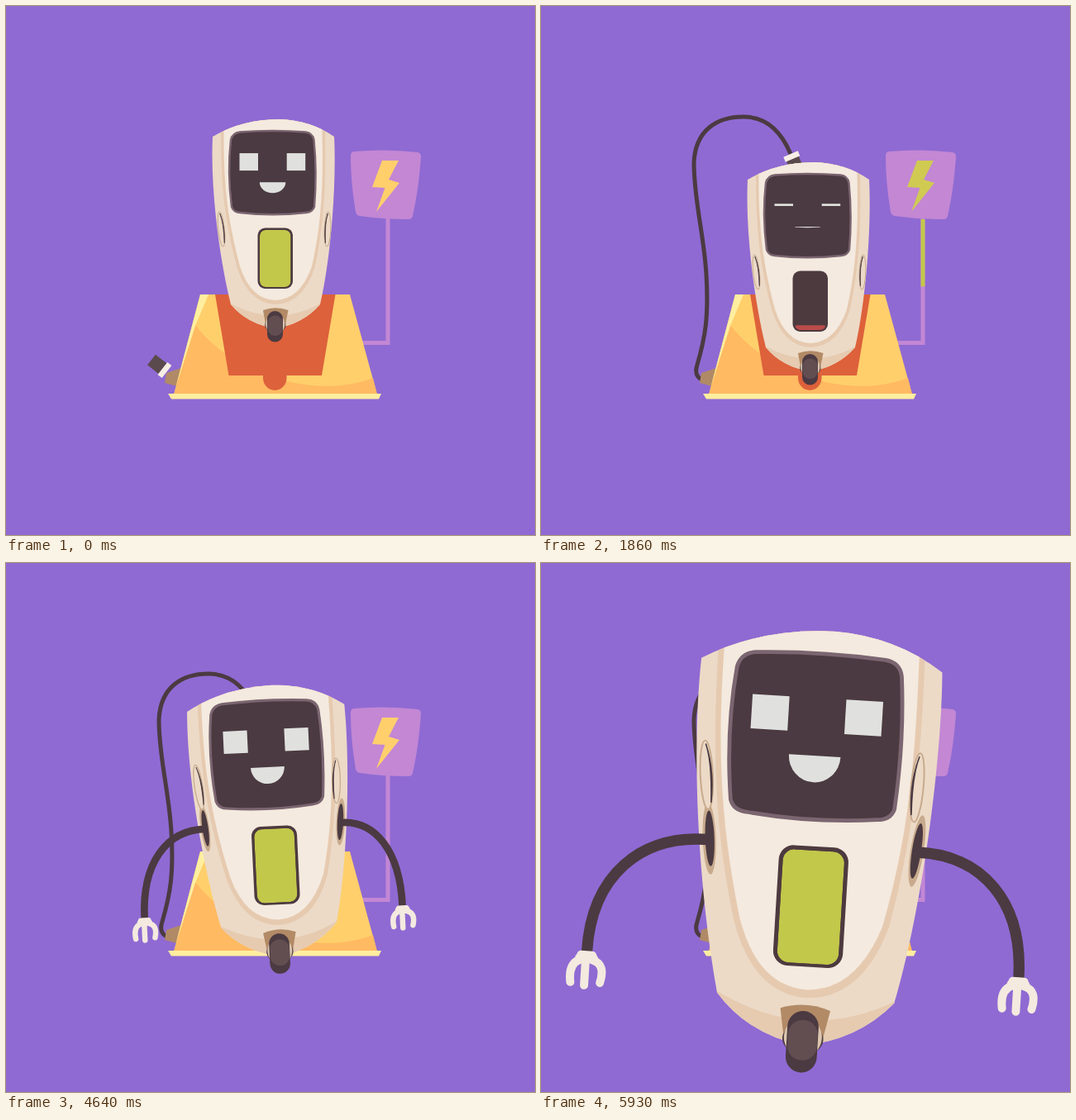
Animation of 640 by 640 pixels, one loop 6000 ms. Source, as an HTML page:

```html
<!DOCTYPE html>
<html lang="en">
<head>
<meta charset="utf-8">
<title>Charging robot</title>
<style>
html, body { margin: 0; width: 100%; height: 100%; overflow: hidden; background: #8f6ad3; }
svg { display: block; width: 100%; height: 100%; }
</style>
</head>
<body>
<svg viewBox="0 0 640 640">
  <defs>
    <path id="bodyShape" d="M250 158 Q285 137.500 330 137 Q368 138 397 158 C400 215 393 305 380 361 Q359 385 326 390 Q292 385 272 361 C258 305 247 220 250 158Z"/>
    <path id="screenShape" d="M283 152.500 Q322 149.500 362 152.500 Q371 153.500 372.500 162 Q376.500 201 373 243 Q371 249.500 363 250 Q322 254.500 283 250 Q275 249.500 273 243 Q267.500 201 272 162 Q274 153.500 283 152.500Z"/>
    <path id="cablePath" d="M203 454 C190 453 185 446 189 434 C199 400 203 375 200 325 C197 275 185 235 185 190 C186.500 150 213 134 245 134 C275 134 292 155 302 179"/>
    <clipPath id="bodyClip"><use href="#bodyShape"/></clipPath>
    <clipPath id="screenClip"><use href="#screenShape"/></clipPath>
    <clipPath id="cellClip"><rect x="307" y="271" width="37.500" height="69" rx="7"/></clipPath>
    <mask id="flowMask" maskUnits="userSpaceOnUse" x="0" y="0" width="640" height="640">
      <use id="flowWindow" href="#cablePath" fill="none" stroke="#fff" stroke-width="8"/>
    </mask>
    <g id="hand" fill="none" stroke="#f4eadf" stroke-width="5" stroke-linecap="round">
      <path d="M-3.500 2 H3.500 M-4 5 Q-11 8 -9 19 M-0.500 5 L-0.500 20.500 M4 5 Q12 7 9 18.500"/>
      <path d="M-4 4 H4" stroke-width="6"/>
    </g>
    <g id="cover" transform="rotate(-6 260.500 270)">
      <ellipse cx="260.500" cy="270" rx="3.800" ry="21" fill="#ecdac7" stroke="#c8aa8d"/>
      <path d="M260.800 251 Q264.200 262 262.500 287 Q265.500 267 260.800 251Z" fill="#4b3a41" stroke="#4b3a41" stroke-width=".8"/>
    </g>
    <g id="hole" transform="rotate(-5.500 261.800 267.500)">
      <ellipse cx="261.500" cy="267.500" rx="4" ry="22" fill="#c8aa8d"/>
      <ellipse cx="261.800" cy="267.500" rx="2.800" ry="17" fill="#4b3a41"/>
    </g>
  </defs>

  <rect width="640" height="640" fill="#8f6ad3"/>

  <g fill="none" stroke-width="5">
    <path d="M462 256 V407.500 H430" stroke="#c387d4"/>
    <path id="energy" d="M462 258 V407.500 H430" stroke="#c2c84a"/>
  </g>
  <path fill="#c387d4" d="M421 176 Q460 172.500 498 177 Q502.500 178 502 183 C500 210 497 232 492 254 Q491 258.500 486 258 Q455 258 428 254 Q424 253.500 423 249 C419 225 417 203 417 181 Q417 176.500 421 176Z"/>
  <path id="bolt" d="M455 187 H475 L463 210 L476 214 L448 249 L458.500 220 L443 219Z"/>

  <use id="cable" href="#cablePath" fill="none" stroke="#4b3a41" stroke-width="5"/>
  <g mask="url(#flowMask)">
    <use id="flow" href="#cablePath" fill="none" stroke="#c2c84a" stroke-width="2.800" stroke-dasharray="11 8"/>
  </g>
  <path fill="#b08a66" d="M194 444 L212 438 L207 460 L192 456Z"/>
  <g id="plug">
    <rect x="-8" y="-23.500" width="16" height="18" fill="#5b4a4d"/>
    <rect x="-9.500" y="-6.500" width="19" height="6.500" fill="#f7efe6"/>
  </g>

  <path fill="#ffcf6b" d="M235 349 H416 L449 470 H203Z"/>
  <path fill="#ffba62" d="M229 386 Q255 420 300 440 C355 465 408 464 444 450 L449 470 H203Z"/>
  <path fill="#ffee9f" d="M235 349 H245 L229 387 L206 459Z"/>
  <path fill="#dd613b" d="M253 349 H398.500 L382 447 H339.500 V450 A14.250 15 0 0 1 311 450 V447 H269.500Z"/>
  <path fill="#ffee9f" d="M196 469 H454 L451 475.500 H200Z"/>

  <g id="robot">
    <use href="#bodyShape" fill="#ecdac7"/>
    <g clip-path="url(#bodyClip)">
      <path fill="#e6cbb0" d="M270 359 Q299 374.500 326 374.500 Q355 374.500 382 359 V395 H270Z"/>
      <path fill="#e6cab0" d="M260 130 V152 C260 220 265 262 279 315 Q293 360 326 361 Q360 360 374 315 C385 262 387.500 215 386 152 V130Z"/>
      <path fill="#f4eadf" d="M263.500 130 V152 C263 220 269 262 283 315 Q296 355 326 356 Q356 355 370 315 C382 262 384 215 382.500 152 V130Z"/>
    </g>
    <use href="#screenShape" fill="#4b3a41"/>
    <path id="shine" clip-path="url(#screenClip)" fill="#fff" opacity=".11"/>
    <use href="#screenShape" fill="none" stroke="#7b6570" stroke-width="2.400"/>
    <g fill="#e0e1de">
      <rect id="eyeL" x="282.500" width="22.500"/>
      <rect id="eyeR" x="339.700" width="22.500"/>
      <path id="mouth"/>
    </g>
    <rect x="304.500" y="268.500" width="42.500" height="73.500" rx="9" fill="#4d3a3f"/>
    <rect id="charge" x="307" width="37.500" clip-path="url(#cellClip)"/>
    <path fill="#b28a66" d="M311 368 Q326 362.500 341.500 368 L338 385 H314Z"/>
    <ellipse cx="325.800" cy="386" rx="12.500" ry="9.500" fill="#4b3a41"/>
    <ellipse cx="325.800" cy="385" rx="11.600" ry="12" fill="#dcc6ae"/>
    <rect x="316" y="369" width="19" height="37.500" rx="9.500" fill="#4b3a41"/>
    <rect x="316.700" y="374.500" width="18" height="24.500" rx="8.700" fill="#624e51"/>
    <g id="holes"><use href="#hole"/><use href="#hole" transform="matrix(-1 0 0 1 649.800 0)"/></g>
    <g id="covers"><use href="#cover"/><use href="#cover" transform="rotate(-4 389 270) matrix(-1 0 0 1 649.500 0)"/></g>
    <g id="arms">
      <path id="armL" fill="none" stroke="#4b3a41" stroke-width="6.700"/>
      <path id="armR" fill="none" stroke="#4b3a41" stroke-width="6.700"/>
      <use id="handL" href="#hand"/>
      <use id="handR" href="#hand"/>
    </g>
  </g>
</svg>
<script>
const LOOP = 6000;
const $ = id => document.getElementById(id);
const set = (id, attrs) => { for (const k in attrs) $(id).setAttribute(k, attrs[k]); };
const lerp = (a, b, k) => a + (b - a) * k;
const clamp = (v, lo = 0, hi = 1) => Math.min(hi, Math.max(lo, v));
const smooth = k => k * k * (3 - 2 * k);
const linear = k => k;
const ramp = (t, from, to) => clamp((t - from) / (to - from));
const mix = (a, b, k) => `rgb(${a.map((v, i) => Math.round(lerp(v, b[i], k)))})`;

// Interpolates between [time, value] stops.
function keys(t, ease, ...stops) {
  if (t <= stops[0][0]) return stops[0][1];
  for (let i = 1; i < stops.length; i++) {
    const [t0, a] = stops[i - 1], [t1, b] = stops[i];
    if (t < t1) return lerp(a, b, ease((t - t0) / (t1 - t0)));
  }
  return stops[stops.length - 1][1];
}

const GREEN = [194, 200, 74], RED = [184, 64, 74], YELLOW = [255, 207, 107];
const cablePath = $("cablePath");
const cableLength = cablePath.getTotalLength();
const trim = (from, to) => `0 ${from} ${Math.max(0, to - from)} 2000`;

function drawCable(t) {
  const start = 6;
  const tip = lerp(start, cableLength, smooth(ramp(t, 400, 1850)));
  const p = cablePath.getPointAtLength(tip);
  const q = cablePath.getPointAtLength(tip - 2);
  const rest = clamp(1 - (tip - start) / 40);
  let angle = Math.atan2(p.y - q.y, p.x - q.x) * 180 / Math.PI + 90;
  if (angle > 180) angle -= 360;
  angle = lerp(angle, -52, rest);
  const shift = keys(t, smooth, [400, 0], [790, -6], [1500, 0]);
  set("plug", { transform: `translate(${lerp(p.x, 194.5, rest)} ${lerp(p.y, 442.5, rest)}) rotate(${angle}) translate(${shift} 0)` });
  set("cable", { "stroke-dasharray": trim(0, tip) });

  const head = clamp((t - 2030) * .48, 0, cableLength);
  const tail = cableLength * ramp(t, 3400, 4000);
  set("flowWindow", { "stroke-dasharray": trim(tail, head) });
  set("flow", { "stroke-dashoffset": -(t - 2030) * .16 });
}

function drawSupply(t) {
  const begin = t < 2570 ? 1590 : 2770;
  const head = clamp((t - begin) * .3, 0, 182);
  const tail = 182 * ramp(t, begin + 650, begin + 1100);
  set("energy", { "stroke-dasharray": trim(tail, head) });
  const glow = keys(t, smooth, [begin - 200, 0], [begin, .77], [begin + 650, .77], [begin + 1000, 0]);
  set("bolt", { fill: mix(YELLOW, GREEN, glow) });
}

function drawFace(t) {
  const eye = keys(t, smooth, [1100, 21], [1550, 2.7], [3750, 2.7], [3920, 16], [4070, 18.5], [4300, 21]);
  for (const id of ["eyeL", "eyeR"]) set(id, { y: 188.6 - eye / 2, height: eye });
  const smile = keys(t, linear, [0, 13], [790, 8.5], [1550, 1.3], [3750, 1.3], [4070, 10], [4600, 15.5], [5930, 16.3]);
  const top = 213.3 + (13 - Math.min(13, smile)) * .14;
  set("mouth", { d: `M306.800 ${top} H338.300 A15.750 ${smile} 0 0 1 306.800 ${top}Z` });
  const x = 190 + (t - 5130) * .46;
  set("shine", { d: `M${x} 140 L${x + 90} 260 H${x + 45} L${x - 45} 140Z` });

  const level = keys(t, linear, [0, 1], [790, .585], [1730, .085], [2500, .085], [3210, .765], [3460, 1]);
  const h = 69 * level;
  set("charge", { y: 340 - h, height: h, rx: Math.min(7, h / 2), fill: mix(RED, GREEN, level) });
}

function drawArm(side, t, sway) {
  const left = side < 0;
  const drop = keys(t, linear, [3880, 0], [4070, .52], [4450, 1]);
  const reach = keys(t, smooth, [3880, 0], [4070, 1]);
  const ax = left ? 261.8 : 388, ay = 268.3;
  const dx = side * (left ? 65.5 + 5 * sway : 60.3 + 6.5 * sway) * reach;
  const dy = (76.7 - 4 * sway) * drop;
  const wx = ax + dx, wy = ay + dy;
  const name = left ? "L" : "R";
  set("arm" + name, { d: `M${ax} ${ay} C${ax + dx * .6} ${ay - 1} ${wx - side * (1 - drop) * 14} ${wy - dy * .64} ${wx} ${wy}` });
  const size = lerp(.6, 1, drop);
  set("hand" + name, { transform: `translate(${wx} ${wy}) rotate(${-32 * (1 - drop)}) scale(${size})` });
}

function drawRobot(t) {
  const sway = Math.cos(2 * Math.PI * (t - 5930) / 891);
  const tilt = sway * keys(t, smooth, [3870, 0], [4070, 2.35], [5210, 3.5]);
  const scale = keys(t, linear, [4070, 1], [5210, 1.59], [5930, 1.986]);
  const x = keys(t, linear, [3870, 325.5], [4070, 324.5], [5210, 327.3], [5930, 326]);
  const y = t < 3870
    ? 304.5 + keys(t, smooth, [0, 0], [790, 1.2], [1850, 52])
    : keys(t, t < 4070 ? smooth : linear, [3870, 356.5], [4070, 326.8], [4500, 356.5], [5210, 398.4], [5930, 414.2]);
  set("robot", { transform: `translate(${x} ${y}) rotate(${tilt}) scale(${scale}) translate(-325.5 -304.5)` });

  const open = smooth(ramp(t, 3780, 3960));
  set("covers", { transform: `translate(${-3 * open} ${-41 * open})` });
  set("holes", { visibility: open > 0 ? "visible" : "hidden" });
  set("arms", { visibility: t > 3880 ? "visible" : "hidden" });
  drawArm(-1, t, sway);
  drawArm(1, t, sway);
}

function render(t) {
  drawCable(t);
  drawSupply(t);
  drawFace(t);
  drawRobot(t);
}

const startTime = performance.now();
function tick() {
  render((performance.now() - startTime) % LOOP);
  requestAnimationFrame(tick);
}
render(0);
requestAnimationFrame(tick);
</script>
</body>
</html>
```
